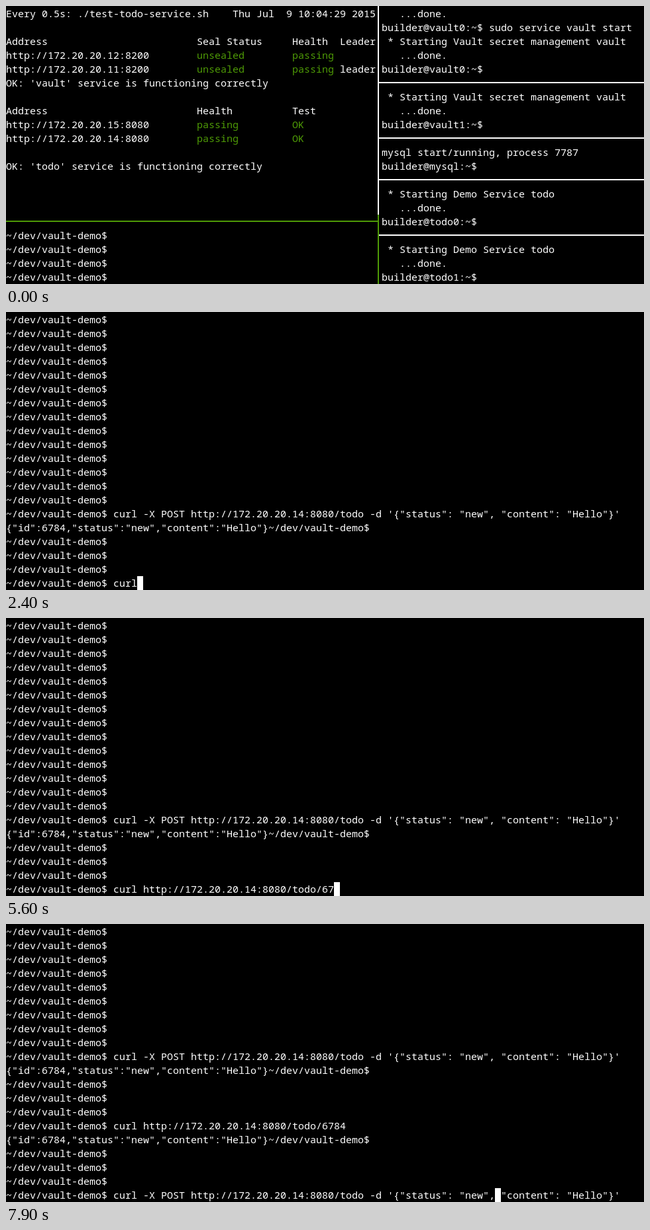
Recreate the animation shown at these times as an HTML page with a canvas. Size 963x421 px, loop 8 s.

```html
<!DOCTYPE html>
<html lang="en">
<head>
<meta charset="utf-8">
<title>Terminal session</title>
<style>
html, body { margin: 0; width: 100%; height: 100%; overflow: hidden; background: #000; }
canvas { display: block; }
</style>
</head>
<body>
<canvas id="stage" width="963" height="421"></canvas>
<script>
const ctx = document.getElementById('stage').getContext('2d');
const LOOP = 8000, STEP = 100;
const CELL_W = 9, CELL_H = 21, ROWS = 20;
const WHITE = '#fff', GREEN = '#4e9a06';
ctx.font = '15px "Noto Sans Mono", "DejaVu Sans Mono", monospace';

const PROMPT = '~/dev/vault-demo$ ';
const POST = `curl -X POST http://172.20.20.14:8080/todo -d '{"status": "new", "content": "Hello"}'`;
const GET = 'curl http://172.20.20.14:8080/todo/6784';
const REPLY = '{"id":6784,"status":"new","content":"Hello"}';

function text(str, col, row, color = WHITE) {
  ctx.fillStyle = color;
  ctx.fillText(str, col * CELL_W, row * CELL_H + 17);
}

function rect(x, y, w, h, color = WHITE) {
  ctx.fillStyle = color;
  ctx.fillRect(x, y, w, h);
}

// Linear interpolation through [time, value] points.
function track(t, points) {
  if (t <= points[0][0]) return points[0][1];
  for (let i = 1; i < points.length; i++) {
    const [t0, v0] = points[i - 1], [t1, v1] = points[i];
    if (t <= t1) return Math.round(v0 + (v1 - v0) * (t - t0) / (t1 - t0));
  }
  return points[points.length - 1][1];
}

function drawPanes() {
  text('Every 0.5s: ./test-todo-service.sh    Thu Jul  9 10:04:29 2015', 0, 0);
  text('Address', 0, 2);
  text('Seal Status', 32, 2);
  text('Health  Leader', 48, 2);
  ['12', '11'].forEach((host, i) => {
    text(`http://172.20.20.${host}:8200`, 0, 3 + i);
    text('unsealed', 32, 3 + i, GREEN);
    text('passing', 48, 3 + i, GREEN);
  });
  text('leader', 56, 4);
  text("OK: 'vault' service is functioning correctly", 0, 5);

  text('Address', 0, 7);
  text('Health', 32, 7);
  text('Test', 48, 7);
  ['15', '14'].forEach((host, i) => {
    text(`http://172.20.20.${host}:8080`, 0, 8 + i);
    text('passing', 32, 8 + i, GREEN);
    text('OK', 48, 8 + i, GREEN);
  });
  text("OK: 'todo' service is functioning correctly", 0, 11);
  for (let row = 16; row < ROWS; row++) text(PROMPT, 0, row);

  const user = host => `builder@${host}:~$`;
  const done = '   ...done.';
  const vault = ' * Starting Vault secret management vault';
  const todo = ' * Starting Demo Service todo';
  [
    done, user('vault0') + ' sudo service vault start', vault, done, user('vault0'), '',
    vault, done, user('vault1'), '',
    'mysql start/running, process 7787', user('mysql'), '',
    todo, done, user('todo0'), '',
    todo, done, user('todo1')
  ].forEach((line, row) => text(line, 63, row));

  for (const row of [5, 9, 12, 16]) rect(562, row * CELL_H + 10, 401, 2);
  rect(561, 0, 2, 316);
  rect(561, 316, 2, 105, GREEN);
  rect(0, 325, 562, 2, GREEN);
}

function inputAt(t) {
  if (t < 1100) return t < 300 ? '' : POST;
  if (t < 6100) return GET.slice(0, track(t, [[2000, 0], [2400, 4], [3800, 22], [5600, 37], [5800, 39]]));
  if (t < 7000) return '';
  return t < 7100 ? GET : POST;
}

function drawShell(t) {
  const lines = Array(ROWS).fill(PROMPT);
  const run = (command, at, enters) => {
    if (t < at) return;
    lines[lines.length - 1] += command;
    lines.push(REPLY + PROMPT);
    for (const enter of enters) if (t >= enter) lines.push(PROMPT);
  };
  run(POST, 1100, [1400, 1500, 1600, 1700]);
  run(GET, 6100, [6600, 6700, 6800, 6900]);

  const input = inputAt(t);
  const start = lines[lines.length - 1].length;
  lines[lines.length - 1] += input;
  lines.slice(-ROWS).forEach((line, row) => text(line, 0, row));

  if (t >= 6400 && t < 6600) return; // cursor blinked off
  const back = t < 7200 ? 0 : track(t, [[7200, 1], [7900, 21]]);
  const at = input.length - back, col = start + at;
  rect(col * CELL_W, 400, CELL_W, CELL_H);
  if (back) text(input[at], col, ROWS - 1, '#000');
}

function frame(now) {
  const t = Math.floor(now % LOOP / STEP) * STEP;
  rect(0, 0, 963, 421, '#000');
  if (t < 100) drawPanes();
  else drawShell(t);
  requestAnimationFrame(frame);
}
requestAnimationFrame(frame);
</script>
</body>
</html>
```
